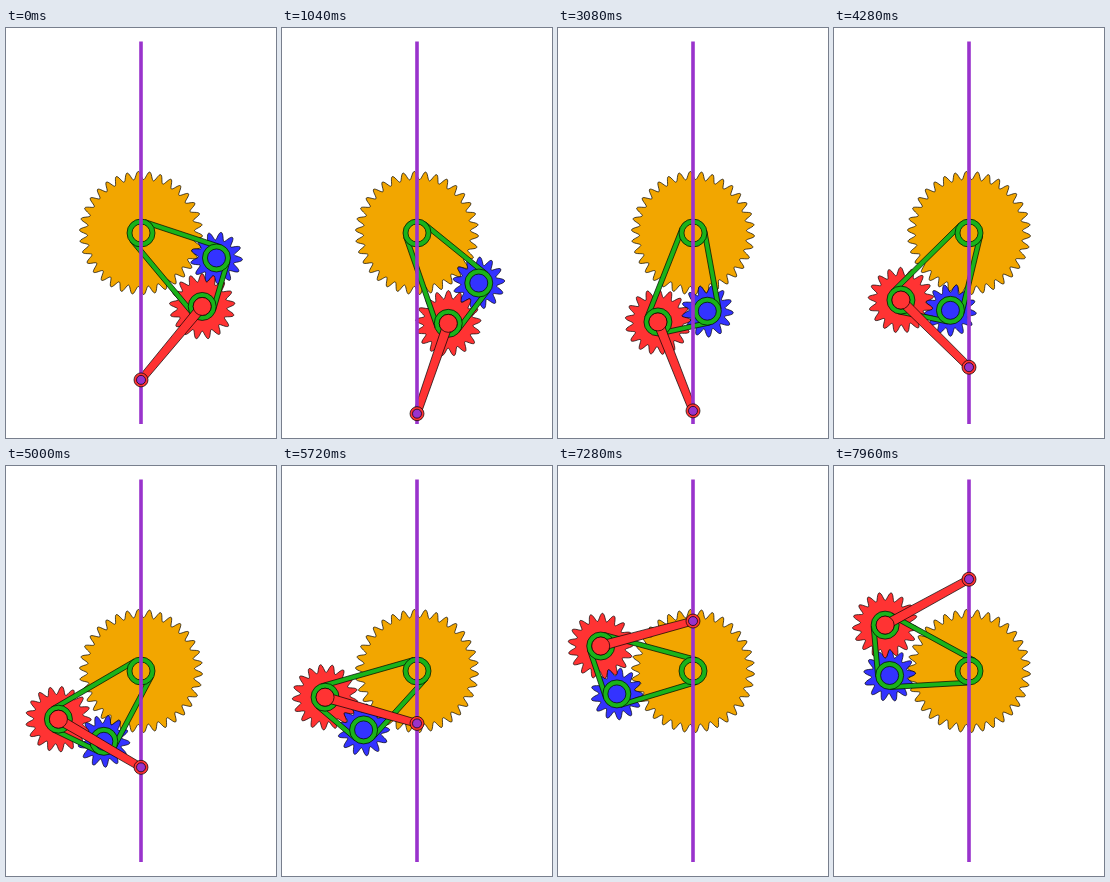
An HTML page with a canvas for the animation above (8000 ms loop, 270x410 px).

```html
<!DOCTYPE html>
<html lang="en">
<head>
<meta charset="utf-8">
<title>Straight-line gear linkage</title>
<style>
  html, body { margin: 0; width: 100%; height: 100%; overflow: hidden; background: #fff; }
  canvas { display: block; }
</style>
</head>
<body>
<canvas id="stage" width="270" height="410"></canvas>
<script>
const ctx = document.getElementById('stage').getContext('2d');
const TAU = 2 * Math.PI, RAD = Math.PI / 180;
const LOOP = 8000, STEP = 40;
const ORANGE = '#f2a600', BLUE = '#3333ff', RED = '#ff3333', GREEN = '#1ab31a', PURPLE = '#9933cc';

const hub = { x: 135, y: 205 };
const CRANK = 95.6, IDLER = 79.5, IDLER_LAG = 31.9 * RAD;
const SUN_TEETH = 34, IDLER_TEETH = 13, PLANET_TEETH = 17;
const SUN_PHASE = -92.5 * RAD;
const PITCH_PER_TOOTH = 1.693, TOOTH = 4;
const RING = 14, BORE = 9, BAR = 4.8, OUTLINE = 0.7;

const polar = (c, r, a) => ({ x: c.x + r * Math.cos(a), y: c.y + r * Math.sin(a) });
const heading = (a, b) => Math.atan2(b.y - a.y, b.x - a.x);

function paint(fill) {
  ctx.fillStyle = fill;
  ctx.fill();
  ctx.strokeStyle = '#000';
  ctx.lineWidth = OUTLINE;
  ctx.stroke();
}

function disc(c, r, fill) {
  ctx.beginPath();
  ctx.arc(c.x, c.y, r, 0, TAU);
  paint(fill);
}

function polygon(points, fill) {
  ctx.beginPath();
  for (const p of points) ctx.lineTo(p.x, p.y);
  ctx.closePath();
  paint(fill);
}

function gear(c, teeth, phase, fill) {
  const pitch = teeth * PITCH_PER_TOOTH, count = teeth * 16;
  const rim = Array.from({ length: count }, (_, i) => {
    const a = i / count * TAU;
    return polar(c, pitch + TOOTH * Math.cos(teeth * a), a + phase);
  });
  polygon(rim, fill);
}

// Rotation that puts a driven tooth into the driver's gap on the line of centres.
const mesh = (dir, driverTeeth, driverPhase, teeth) =>
  dir + Math.PI + (driverTeeth * (dir - driverPhase) - Math.PI) / teeth;

// Bar between two centres, its edges offset sideways at each end.
function bar(from, to, [fromLeft, fromRight], [toLeft, toRight], fill) {
  const side = heading(from, to) - Math.PI / 2;
  polygon([
    polar(from, fromLeft, side), polar(to, toLeft, side),
    polar(to, toRight, side), polar(from, fromRight, side)
  ], fill);
}

function carrier(joints) {
  const edges = [RING, RING - BAR];
  joints.forEach(({ c }, i) => bar(c, joints[(i + 1) % joints.length].c, edges, edges, GREEN));
  for (const { c, color } of joints) {
    disc(c, RING, GREEN);
    disc(c, BORE, color);
  }
}

function draw(time) {
  const crank = (50.2 + 0.01991 * time) * RAD;
  const planet = polar(hub, CRANK, crank);
  const idlerDir = crank - IDLER_LAG;
  const idler = polar(hub, IDLER, idlerDir);
  const pin = { x: hub.x, y: 2 * planet.y - hub.y };
  const idlerPhase = mesh(idlerDir, SUN_TEETH, SUN_PHASE, IDLER_TEETH);
  const planetPhase = mesh(heading(idler, planet), IDLER_TEETH, idlerPhase, PLANET_TEETH);

  ctx.clearRect(0, 0, 270, 410);
  gear(hub, SUN_TEETH, SUN_PHASE, ORANGE);
  gear(idler, IDLER_TEETH, idlerPhase, BLUE);
  gear(planet, PLANET_TEETH, planetPhase, RED);
  // Clockwise order keeps the bars on the outer tangents.
  carrier([{ c: hub, color: ORANGE }, { c: idler, color: BLUE }, { c: planet, color: RED }]);
  bar(planet, pin, [4.8, -4.8], [3.8, -3.8], RED);
  disc(planet, BORE, RED);
  ctx.fillStyle = PURPLE;
  ctx.fillRect(133.2, 13.5, 3.6, 382.5);
  disc(pin, 7, RED);
  disc(pin, 4.5, PURPLE);
}

function tick() {
  const elapsed = performance.now() % LOOP;
  draw(Math.floor(elapsed / STEP) * STEP);
  requestAnimationFrame(tick);
}
tick();
</script>
</body>
</html>
```
